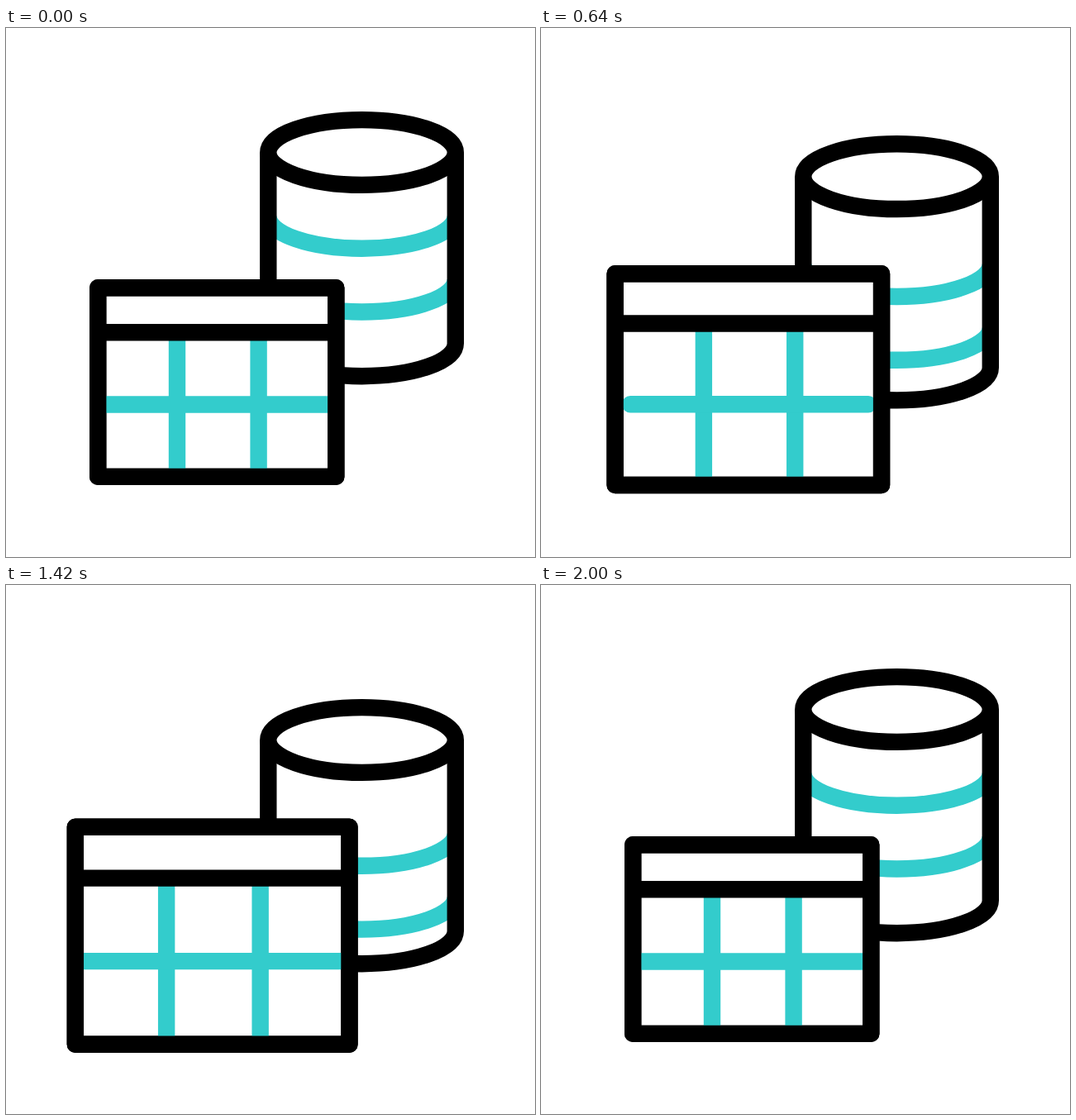
Animation, 640 px wide and 640 px high, one loop 2220 ms. Source, as an HTML page:

```html
<!DOCTYPE html>
<html lang="en">
<head>
<meta charset="utf-8">
<title>Database and table</title>
<style>
  html, body { margin: 0; width: 100%; height: 100%; overflow: hidden; background: #fff; }
  svg { display: block; width: 100%; height: 100%; }
  path, rect, ellipse { fill: none; stroke: #000; stroke-width: 20.4; stroke-linejoin: round; }
  .teal { stroke: #33cccc; }
  .white { fill: #fff; }
</style>
</head>
<body>
<svg viewBox="0 0 640 640">
  <clipPath id="inside">
    <path d="M317.3 150.5V381.8A113.25 39.4 0 0 0 543.8 381.8V150.5Z"/>
  </clipPath>
  <g id="drum">
    <g clip-path="url(#inside)">
      <path class="teal stripe" d="M317.3 150.5A113.25 39.4 0 0 0 543.8 150.5"/>
      <path class="teal stripe" d="M317.3 150.5A113.25 39.4 0 0 0 543.8 150.5"/>
      <path class="teal stripe" d="M317.3 150.5A113.25 39.4 0 0 0 543.8 150.5"/>
    </g>
    <path d="M317.3 150.5V381.8A113.25 39.4 0 0 0 543.8 381.8V150.5"/>
    <ellipse class="white" cx="430.55" cy="150.5" rx="113.25" ry="39.4"/>
  </g>
  <rect id="back" class="white"/>
  <path id="columns" class="teal"/>
  <path id="row" class="teal" stroke-linecap="round"/>
  <rect id="frame"/>
  <path id="header"/>
</svg>
<script>
const LOOP = 2220, STEP = 20;
const DOWN = { start: 200, length: 1000 };
const UP = { start: 1400, length: 600 };
const GAP = 76.8;      // distance between stripes
const TRAVEL = 37.7;   // how far the drum sinks

const $ = id => document.getElementById(id);
const stripes = document.querySelectorAll('.stripe');
const lerp = (a, b, k) => a + (b - a) * k;
const clamp = k => Math.min(1, Math.max(0, k));
const part = (t, phase) => clamp((t - phase.start) / phase.length);

function bezier(x1, y1, x2, y2) {
  const at = (a, b, s) => 3 * (1 - s) ** 2 * s * a + 3 * (1 - s) * s * s * b + s ** 3;
  return x => {
    if (x <= 0 || x >= 1) return clamp(x);
    let lo = 0, hi = 1;
    for (let i = 0; i < 30; i++) {
      const mid = (lo + hi) / 2;
      if (at(x1, x2, mid) < x) lo = mid; else hi = mid;
    }
    return at(y1, y2, lo);
  };
}

const sink = bezier(0.167, 0.167, 0.25, 1);
const rise = bezier(0.25, 0.1, 0.25, 1);
const flow = bezier(0.33, 0.1, 0.365, 1);
const smooth = k => k * k * (3 - 2 * k);

function setRect(el, x, y, right, bottom) {
  const box = { x, y, width: right - x, height: bottom - y };
  for (const key in box) el.setAttribute(key, box[key]);
}

function drawTable(p, reach) {
  const left = lerp(111.2, 83.3, p), right = lerp(399.3, 415.8, p);
  const top = lerp(314.2, 292.2, p), bottom = lerp(542.9, 556, p);
  const head = lerp(368.2, 354.4, p), mid = lerp(455.5, 455.1, p);
  const col1 = lerp(207, 193.9, p), col2 = lerp(305.6, 307.7, p);
  setRect($('back'), left, top, right, bottom);
  setRect($('frame'), left, top, right, bottom);
  $('header').setAttribute('d', `M${left} ${head}H${right}`);
  $('columns').setAttribute('d', `M${col1} ${head}V${bottom}M${col2} ${head}V${bottom}`);
  $('row').setAttribute('d', `M${lerp(121.2, 89.2, reach)} ${mid}H${lerp(389, 406, reach)}`);
}

function drawDrum(p, t) {
  $('drum').setAttribute('transform', `translate(0 ${TRAVEL * p})`);
  const back = flow(part(t, UP));
  stripes.forEach((stripe, i) => {
    let y = GAP * (i + 1);
    if (t <= UP.start) {
      y += TRAVEL * p;
    } else {
      // stripes run upward by one and a half gaps; the first slips under the rim
      y += TRAVEL - (TRAVEL + GAP + (i ? 0 : 3.5)) * back;
    }
    stripe.setAttribute('transform', `translate(0 ${y})`);
    stripe.style.display = i === 2 && t <= UP.start || i === 0 && back === 1 ? 'none' : '';
  });
}

function draw(now) {
  const t = Math.floor(now % LOOP / STEP) * STEP;
  const falling = t <= UP.start;
  const p = falling ? sink(part(t, DOWN)) : 1 - rise(part(t, UP));
  drawDrum(p, t);
  drawTable(p, falling ? smooth(part(t, DOWN)) : p);
}

const begin = performance.now();
function tick() {
  draw(performance.now() - begin);
  requestAnimationFrame(tick);
}
tick();
</script>
</body>
</html>
```
